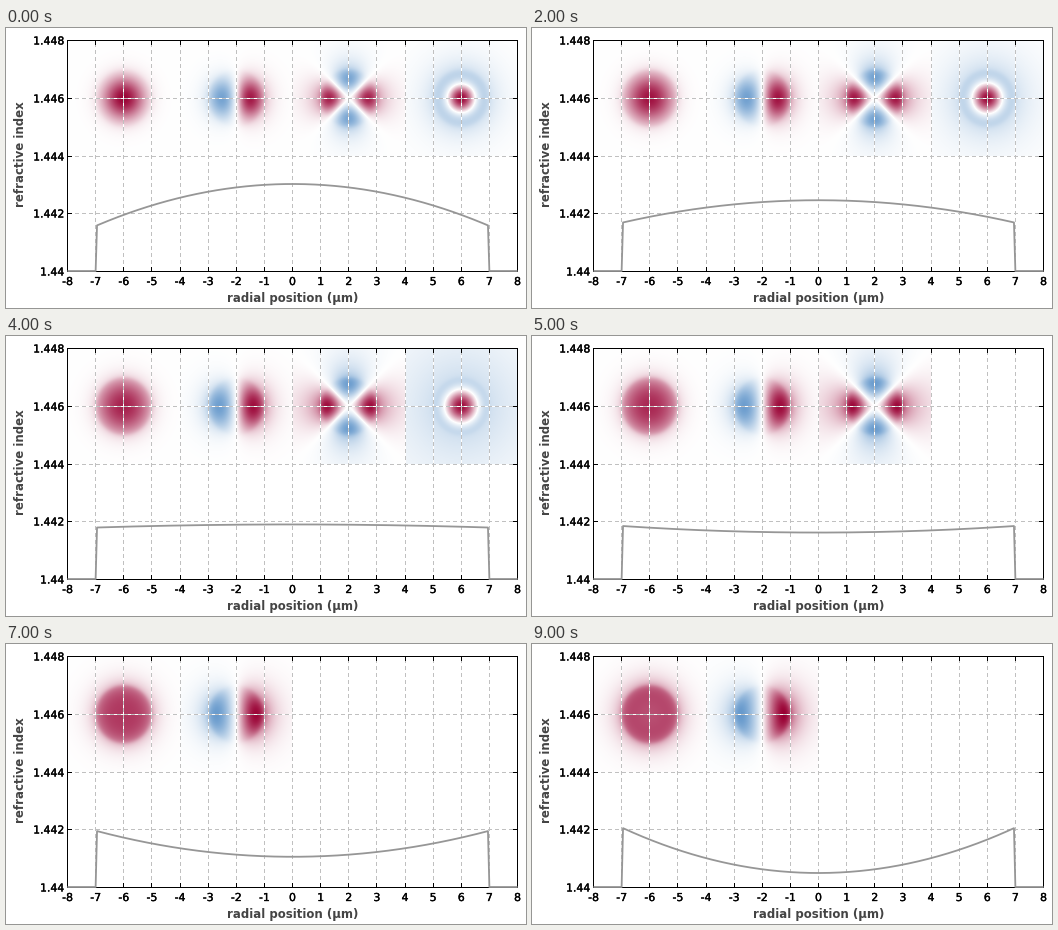
Recreate the animation shown at these times as a matplotlib script. Size 520 px wide and 280 px high, loop 10 s.

```python
import numpy as np
import matplotlib.pyplot as plt
from matplotlib.animation import FuncAnimation
from matplotlib.patheffects import withStroke

W, H, DPI = 520, 280, 100
STEPS = 10
LEFT, RIGHT, TOP, BASE = 61.5, 511.5, 12.5, 243.5
UNIT = (RIGHT - LEFT) / 16          # pixels per micrometre on the axis
ROW = (BASE - TOP) / 4              # pixels per 0.002 of index
CORE, WAVELENGTH, N_CLAD = 7.0, 0.8, 1.44
RED = np.array([153, 0, 51]) / 255
BLUE = np.array([102, 153, 204]) / 255
GREY = "#969696"

# l, radial order, last step at which the mode is guided, strength (first, per step)
MODES = [(0, 0, 9, 0.99, -0.03),
         (1, 0, 9, 0.9, 0.011),
         (2, 0, 5, 0.87, 0.02),
         (0, 1, 4, 0.97, -0.005)]


def pt(px):
    return px * 72 / DPI


def x_px(r):
    return LEFT + (r + 8) * UNIT


def profile(step):
    """Pixel heights of the index curve at the core centre and the core edge."""
    t = step / (STEPS - 1)
    return 156 + 73 * t, 198 - 14.5 * t


def radial_modes(step, l, h=0.1, count=350):
    """Scalar mode fields of the fibre on a radial grid, most strongly guided first."""
    centre, edge = profile(step)
    r = (np.arange(count) + 0.5) * h
    height = 243 - (centre + (edge - centre) * (r / CORE) ** 2)
    dn = np.where(r < CORE, height / ROW * 0.002, 0)
    q = (2 * np.pi / WAVELENGTH) ** 2 * 2 * N_CLAD * dn
    off = np.arange(1, count) * h / (h * h * np.sqrt(r[1:] * r[:-1]))
    a = np.diag(q - l * l / r**2 - 2 / h**2) + np.diag(off, 1) + np.diag(off, -1)
    vecs = np.linalg.eigh(a)[1][:, ::-1]
    return r, vecs / np.sqrt(r)[:, None]


def paint(step):
    """Colour image of all guided modes, one RGB value per stage pixel."""
    img = np.ones((H, W, 3))
    py, px = np.mgrid[0:H, 0:W] + 0.5
    solved = {}
    for i, (l, order, last, first, slope) in enumerate(MODES):
        if step > last:
            continue
        if l not in solved:
            solved[l] = radial_modes(step, l)
        r, fields = solved[l]
        f = fields[:, order]
        f = f * np.sign(f[3]) / np.abs(f).max()
        # soft step from the core to the paler cladding
        core = 1 / (1 + np.exp((r - CORE) / 0.3))
        inner = np.abs(f) ** (1 - 0.055 * step) if i == 0 else f
        f = inner * core + 0.8 * f * (1 - core)

        dx = (px - x_px(-6 + 4 * i)) / UNIT * CORE
        dy = (py - TOP - ROW) / ROW * 2 * CORE
        rad, ang = np.hypot(dx, dy), np.arctan2(dy, dx)
        v = np.interp(rad, r, f) * np.cos(l * ang) * (first + slope * step)
        tint = np.where((v > 0)[..., None], RED, BLUE)
        rgb = 1 - np.abs(v)[..., None] * (1 - tint)
        inside = (np.abs(dx) < 2 * CORE) & (np.abs(dy) < 2 * CORE)
        img[inside] = rgb[inside]
    return np.clip(img, 0, 1)


def index_curve(step):
    centre, edge = profile(step)
    r = np.linspace(-CORE + 0.05, CORE - 0.05, 279)
    y = centre + (edge - centre) * (r / CORE) ** 2
    xs = np.concatenate([[-8, -CORE], r, [CORE, 8]])
    ys = np.concatenate([[243, 243], y, [243, 243]])
    return x_px(xs), ys


plt.rcParams["font.family"] = "DejaVu Sans"
fig = plt.figure(figsize=(W / DPI, H / DPI), dpi=DPI, facecolor="white")
ax = fig.add_axes([0, 0, 1, 1])
picture = ax.imshow(np.ones((H, W, 3)), extent=(0, W, H, 0),
                    interpolation="nearest", aspect="auto", zorder=1)
ax.set_xlim(0, W)
ax.set_ylim(H, 0)
ax.axis("off")


def segment(xs, ys, color, zorder, **style):
    ax.plot(xs, ys, color=color, lw=pt(1), snap=False, zorder=zorder,
            solid_capstyle="butt", dash_capstyle="butt",
            solid_joinstyle="miter", **style)


def grid_line(xs, ys):
    segment(xs, ys, "white", 2)
    segment(xs, ys, "#c0c0c0", 2.5, dashes=(4, 3))


def label(x, y, text, **style):
    style = {"fontsize": pt(10.9), "ha": "center", "va": "center",
             "color": "black", **style}
    return ax.text(x, y, text, **style)


def tick_label(x, y, text, **style):
    stroke = withStroke(linewidth=pt(0.35), foreground="black")
    label(x, y, text, **style).set_path_effects([stroke])


def snap(v):
    return np.floor(v) + 0.5


for n in range(-8, 9):
    x = snap(x_px(n))
    if abs(n) < 8:
        grid_line([x, x], [BASE - 0.5, TOP + 0.5])
        segment([x, x], [BASE, BASE - 4.5], "black", 3)
        segment([x, x], [TOP, TOP + 4.5], "black", 3)
    tick_label(x_px(n), 254, str(n))

for n in range(5):
    y = snap(BASE - n * ROW)
    if 0 < n < 4:
        grid_line([LEFT + 0.5, RIGHT - 0.5], [y, y])
        segment([LEFT, LEFT + 4.5], [y, y], "black", 3)
        segment([RIGHT, RIGHT - 4.5], [y, y], "black", 3)
    tick_label(58, y + 1, f"{1.44 + 0.002 * n:.3f}" if n else "1.44", ha="right")

segment([LEFT, RIGHT, RIGHT, LEFT, LEFT, RIGHT],
        [TOP, TOP, BASE, BASE, TOP, TOP], "black", 3)

title = {"fontsize": pt(11.75), "fontweight": "bold", "color": "#444444"}
label(286.5, 270.5, "radial position (µm)", **title)
label(14.5, 126, "refractive index", rotation=90, **title)

curve, = ax.plot([], [], color=GREY, lw=pt(1.8), snap=False, zorder=4,
                 solid_capstyle="butt", solid_joinstyle="round")

images = [paint(step) for step in range(STEPS)]


def draw(step):
    picture.set_data(images[step])
    curve.set_data(*index_curve(step))
    return picture, curve


anim = FuncAnimation(fig, draw, frames=STEPS, init_func=lambda: draw(0),
                     interval=1000, repeat=True, repeat_delay=0, blit=False)
plt.show()
```
